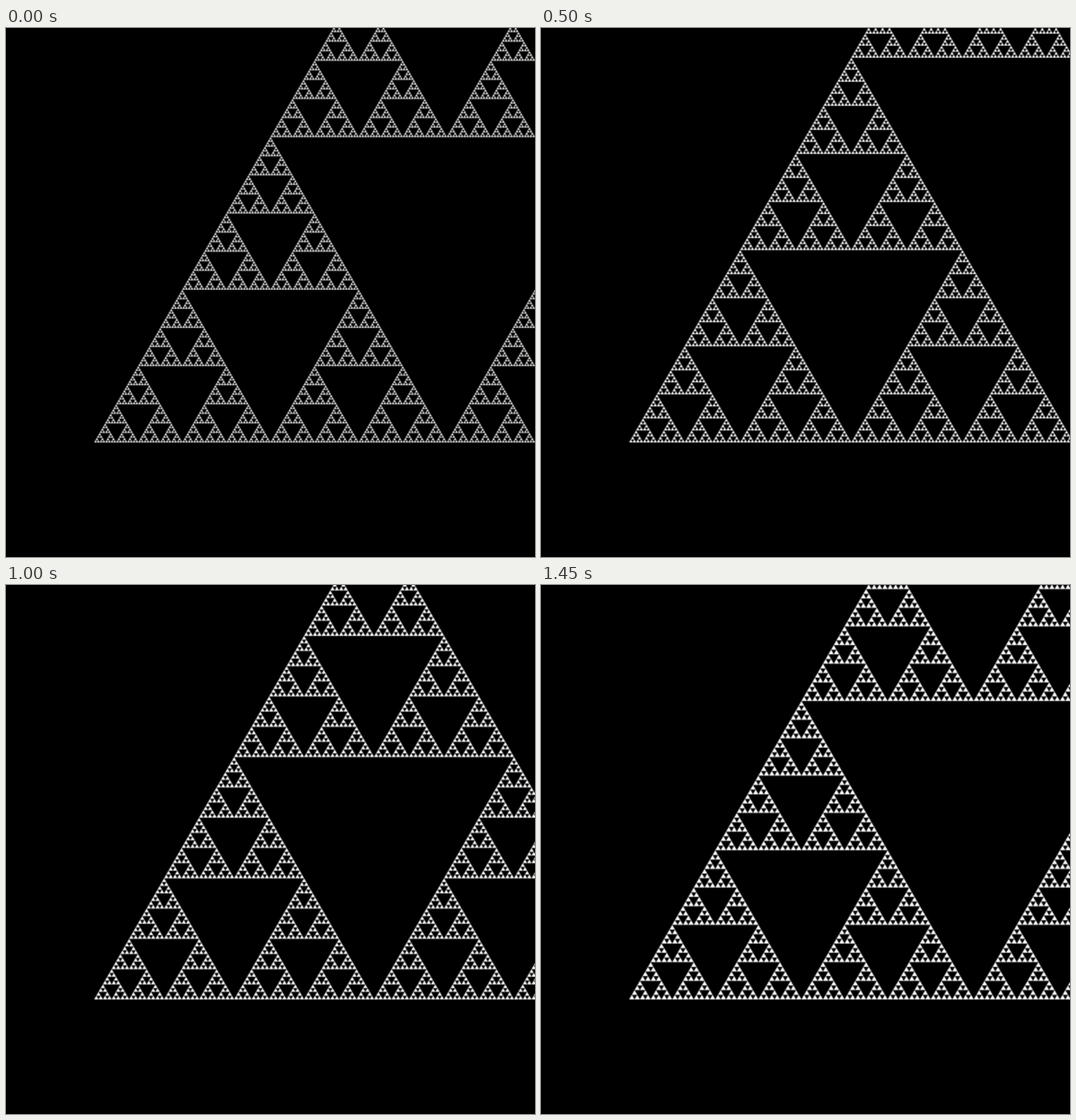
Animation of 748x748 px, one loop 1.5 s. Source, as an HTML page:

```html
<!DOCTYPE html>
<html lang="en">
<head>
<meta charset="utf-8">
<title>Endless triangle zoom</title>
<style>
  html, body { margin: 0; width: 100%; height: 100%; overflow: hidden; background: #000; }
  svg { display: block; width: 100%; height: 100%; }
</style>
</head>
<body>
<svg viewBox="0 0 748 748">
  <filter id="soften" filterUnits="userSpaceOnUse" x="0" y="0" width="748" height="748"
          color-interpolation-filters="sRGB">
    <feConvolveMatrix order="3" kernelMatrix="1 3 1 3 9 3 1 3 1" divisor="25" preserveAlpha="true"/>
  </filter>
  <g filter="url(#soften)">
    <rect width="748" height="748" fill="#000"/>
    <path id="gasket" fill="#fff"/>
  </g>
</svg>
<script>
  const LOOP = 1500, STEP = 50, SIZE = 748;
  const H = Math.sqrt(3) / 2;              // height of a unit triangle
  const CELLS = 256;                       // smallest triangles along the base
  const LEAF = SIZE * 4 / 3 / CELLS;       // their side at the start of a loop
  const CORNER = [SIZE / 6, SIZE * (1 - H / 4)];   // fixed point of the zoom
  const gasket = document.getElementById('gasket');

  // Cell (i, j) of the triangular grid is solid when i and j share no bits.
  function buildPath() {
    let d = '';
    for (let j = 0; j < CELLS; j++) {
      for (let i = 0; i < CELLS - j; i++) {
        if (i & j) continue;
        d += `M${i + j / 2} ${(-j * H).toFixed(4)}h1l-.5 ${-H.toFixed(4)}z`;
      }
    }
    return d;
  }

  // The scale doubles over one loop, so the figure meets itself again.
  function draw(ms) {
    const t = Math.floor((ms % LOOP) / STEP) * STEP;
    const scale = LEAF * 2 ** (t / LOOP);
    gasket.setAttribute('transform', `translate(${CORNER}) scale(${scale})`);
  }

  gasket.setAttribute('d', buildPath());
  draw(0);

  let start;
  function tick(now) {
    start ??= now;
    draw(now - start);
    requestAnimationFrame(tick);
  }
  requestAnimationFrame(tick);
</script>
</body>
</html>
```
